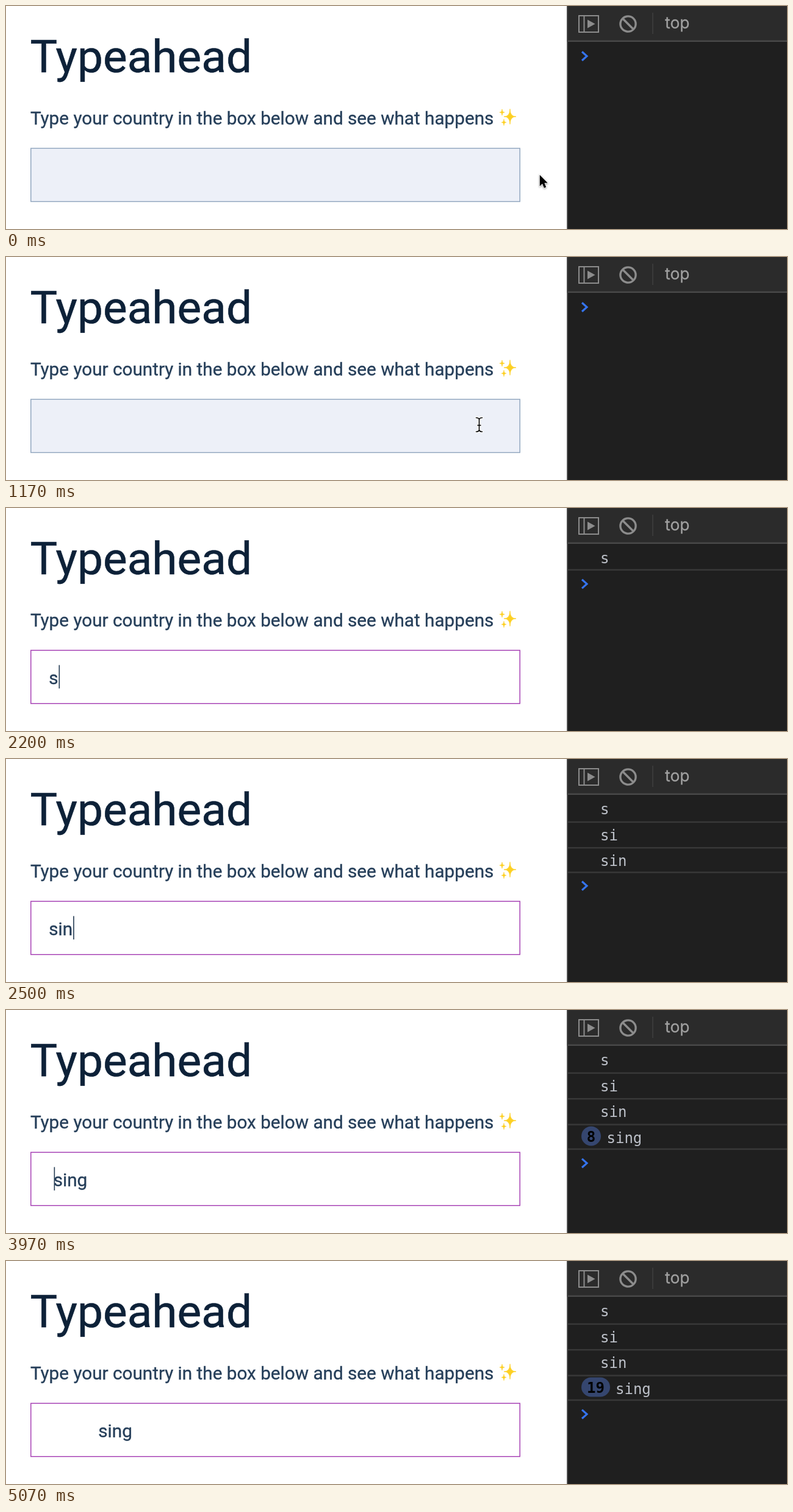
Animation, 1280 px wide and 367 px high, one loop 5430 ms. Source, as an HTML page:

```html
<!DOCTYPE html>
<html lang="en">
<head>
<meta charset="utf-8">
<title>Typeahead</title>
<style>
  html, body { margin: 0; width: 100%; height: 100%; overflow: hidden; background: #fff; }
  svg { display: block; width: 1280px; height: 367px; }
  text { white-space: pre; font: 29.7px Roboto, sans-serif; fill: #263f5a; stroke: #263f5a; stroke-width: .35; }
  #title { font-size: 74.8px; fill: #0d2138; stroke: #0d2138; stroke-width: .6; }
  #context { font: 26.4px Inter, sans-serif; fill: #a0a0a0; stroke: #a0a0a0; }
  #log text { font: 24px "DejaVu Sans Mono", monospace; fill: #bdc1c9; stroke: none; }
  #badge text { font-weight: bold; fill: #000; text-anchor: middle; }
  .icon { fill: none; stroke: #8c8c8c; }
</style>
</head>
<body>
<svg viewBox="0 0 1280 367">
  <text id="title" x="39.6" y="108.5">Typeahead</text>
  <text x="39.9" y="195">Type your country in the box below and see what happens</text>
  <g id="sparkles" fill="#fdd023"></g>

  <rect id="box" x="40.75" y="234.25" width="801.5" height="87.5" stroke-width="1.5"/>
  <text id="field" x="70.3" y="290"></text>
  <rect id="caret" y="258.5" width="1.6" height="38.5" fill="#243b53"/>

  <rect x="919.5" width="361" height="367" fill="#1f1f1f"/>
  <rect x="919.5" width="361" height="57" fill="#2b2b2b"/>
  <rect x="919.5" y="56.5" width="361" height="2.5" fill="#494949"/>
  <rect x="919.5" width="1.5" height="367" fill="#414141"/>
  <path class="icon" stroke-width="2" d="M939 16H971V43H939ZM947.5 16V43"/>
  <path fill="#8c8c8c" d="M953 22.5L965.5 29.5L953 36.5Z"/>
  <g class="icon" stroke-width="3.4">
    <circle cx="1019.5" cy="29.5" r="12.6"/>
    <path d="M1010.5 20.5L1028.5 38.5"/>
  </g>
  <rect x="1059" y="11" width="2" height="35" fill="#3a3a3a"/>
  <text id="context" x="1080" y="37">top</text>

  <g id="log"></g>
  <path id="prompt" d="M944 -7.2L952 0L944 7.2" fill="none" stroke="#3574ee" stroke-width="3.2"/>

  <g id="pointer">
    <circle id="ring" r="24.7" fill="#fff" stroke="#000" stroke-width="2.2"/>
    <path id="arrow" d="M.3 .5V19L4.5 15L7.5 22L10.7 20.6L7.9 13.8H13.3Z" stroke="#fff"
      stroke-width="1.6" paint-order="stroke" style="filter:drop-shadow(0 1.5px 1.5px #0006)"/>
    <g id="beam" fill="none" stroke-linecap="round" transform="translate(0 .5)"></g>
  </g>
</svg>
<script>
const LOOP = 5430, CLICK = 1300, RELEASE = 1370, HOME = 3630, BLINK = 530, LOG_LAG = 18;
const ROW = 42.4;
const $ = id => document.getElementById(id);
const set = (el, attrs) => Object.entries(attrs).forEach(([k, v]) => el.setAttribute(k, v));
const show = (el, on) => { el.style.display = on ? '' : 'none'; };

// A held key: one press, then steady repeats.
const held = (press, start, gap, n) =>
  [press, ...Array.from({ length: n }, (_, i) => start + gap * i)];

const letters = [2000, 2400, 2470, 2600];
const trailing = held(2870, 3065, 43, 6);
const leading = held(3970, 4170, 36.7, 10);
const keys = [...letters, ...trailing, ...leading];
const activity = [CLICK, HOME, ...keys];
const passed = (times, t) => times.filter(k => k <= t).length;

// Four-pointed star with sides pulled in to its centre.
const star = (x, y, w, h) =>
  `<path d="M${x} ${y - h}Q${x} ${y} ${x + w} ${y}Q${x} ${y} ${x} ${y + h}` +
  `Q${x} ${y} ${x - w} ${y}Q${x} ${y} ${x} ${y - h}Z" stroke="#fdd023" stroke-width=".8"/>`;
$('sparkles').innerHTML = star(826, 182, 10, 12.5) + star(813, 175, 4, 5) + star(816, 191.5, 4, 5);

const beam = 'M-5 -11.5Q-.5 -11.5 0 -8.5Q.5 -11.5 5 -11.5M0 -8.5V8.5M-5 11.5Q-.5 11.5 0 8.5Q.5 11.5 5 11.5M-2.5 1H2.5';
$('beam').innerHTML = `<path d="${beam}" stroke="#fff" stroke-width="4"/><path d="${beam}" stroke="#000" stroke-width="1.6"/>`;

function drawField(t) {
  const focused = t >= CLICK;
  set($('box'), { fill: focused ? '#fff' : '#edf0f8', stroke: focused ? '#a743b5' : '#93a8c0' });
  const lead = passed(leading, t);
  const word = 'sing'.slice(0, passed(letters, t));
  const value = ' '.repeat(lead) + word + ' '.repeat(passed(trailing, t));
  if ($('field').textContent !== value) $('field').textContent = value;

  const at = t < HOME ? value.length : lead;
  const offset = at ? $('field').getSubStringLength(0, at) : 0;
  const last = Math.max(...activity.filter(k => k <= t));
  $('caret').setAttribute('x', 71.2 + offset);
  show($('caret'), focused && (t - last) % (2 * BLINK) < BLINK);
}

function drawLog(t) {
  const total = passed(keys, t - LOG_LAG), rows = Math.min(total, 4), repeats = total - 3;
  const wide = repeats > 9;
  let out = '';
  for (let i = 0; i < rows; i++) {
    const badge = i === 3 && repeats > 1;
    const x = badge ? (wide ? 999 : 984.5) : 974;
    const line = 102.5 + ROW * i - (i === rows - 1 ? 2 : 0);
    out += `<rect x="921" y="${line}" width="359" height="2.5" fill="#383838"/>`;
    out += `<text x="${x}" y="${91.3 + ROW * i}">${'sing'.slice(0, i + 1)}</text>`;
    if (badge) {
      const w = wide ? 47 : 32;
      out += `<g id="badge"><rect x="943" y="191.5" width="${w}" height="32" rx="16" fill="#35466f"/>` +
        `<text x="${943 + w / 2}" y="216.5">${repeats}</text></g>`;
    }
  }
  if ($('log').innerHTML !== out) $('log').innerHTML = out;
  $('prompt').setAttribute('transform', `translate(0 ${82.5 + ROW * rows - (rows === 3 ? 1 : 0)})`);
}

function drawPointer(t) {
  const clamp = v => Math.min(1, Math.max(0, v));
  const drift = Math.sin(Math.PI * clamp((t - 30) / 200));
  const u = clamp((t - 870) / 300), ease = u * u * (3 - 2 * u);
  const x = 874.5 + 18 * drift - 99 * ease, y = 277.5 + 10 * drift - 2 * ease;
  const over = x < 843;
  set($('pointer'), { transform: `translate(${x} ${y})` });
  show($('pointer'), t < letters[0]);
  show($('arrow'), !over);
  show($('beam'), over);
  show($('ring'), t >= CLICK && t < RELEASE);
}

const start = performance.now();
function frame() {
  const t = (performance.now() - start) % LOOP;
  drawField(t);
  drawLog(t);
  drawPointer(t);
  requestAnimationFrame(frame);
}
frame();
</script>
</body>
</html>
```
